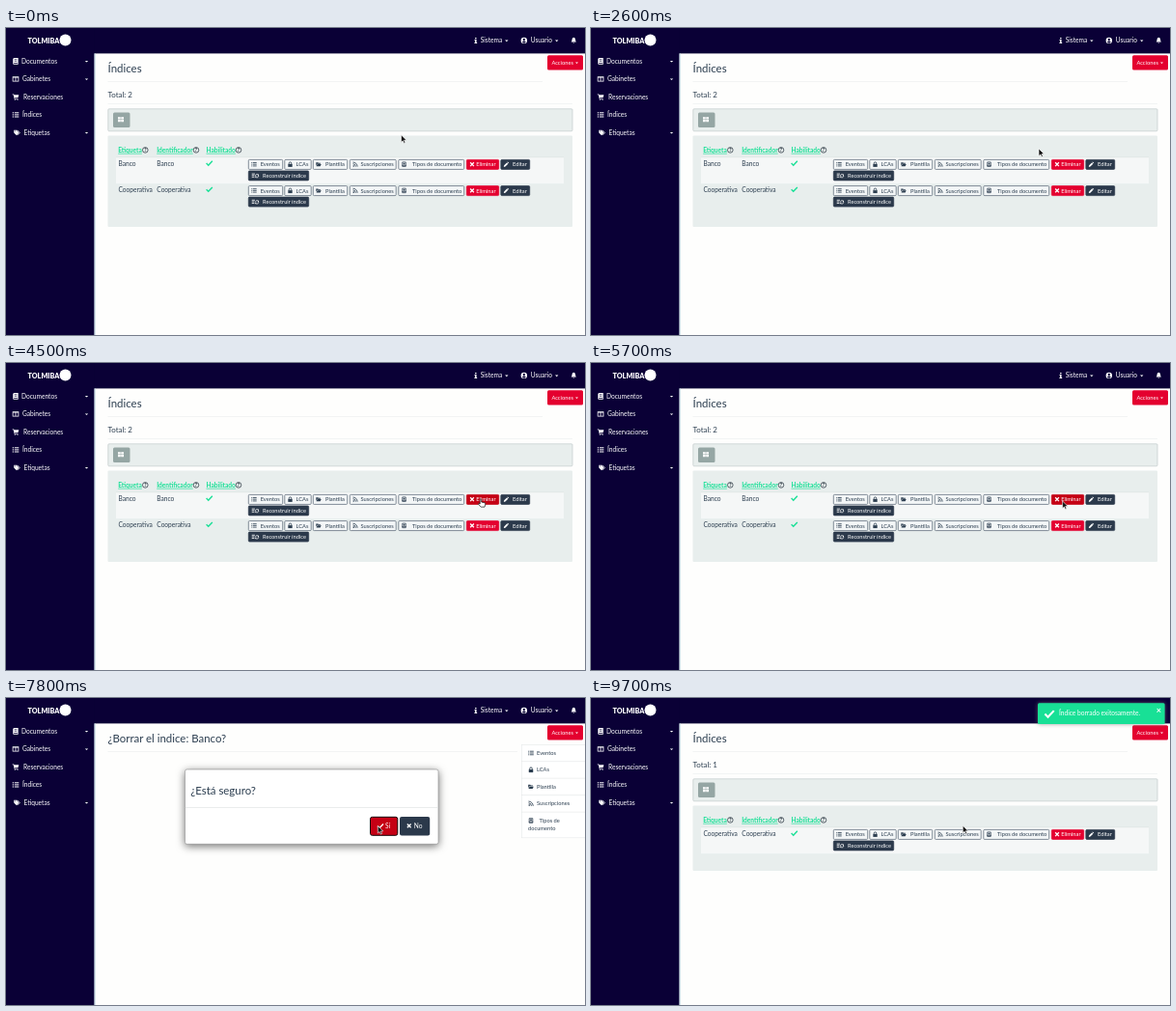
An HTML page for the animation above (9900 ms loop, 600 px wide and 318 px high).

```html
<!DOCTYPE html>
<html lang="es">
<head>
<meta charset="utf-8">
<title>Índices</title>
<style>
  html, body { margin: 0; width: 100%; height: 100%; overflow: hidden; background: #fefefd; }
  svg { display: block; width: 600px; height: 318px; font-family: Lato, sans-serif; }
  text { white-space: pre; }
</style>
</head>
<body>
<svg id="stage" viewBox="0 0 600 318"></svg>
<script>
const LOOP = 9900, TICK = 100;
const CLICK = 5700, ASK = 6000, CONFIRM = 7600, DONE = 7900, FADE = 300;
const NAVY = '#0a0036', INK = '#2c3e50', DARK = '#2b394b', RED = '#e4002f',
      HOVER = '#c50014', GREEN = '#18e096', WELL = '#e8eeed', WHITE = '#fff';

// Icons live in a 10 x 10 box.
const line = (d, w = 1.5) => `<path d="${d}" fill="none" stroke="currentColor" stroke-width="${w}"/>`;
const solid = d => `<path d="${d}" fill-rule="evenodd"/>`;
const icons = {
  list: line('M0 1.8H2M0 5H2M0 8.2H2M3.2 1.8H10M3.2 5H10M3.2 8.2H10'),
  lock: solid('M1 4.5H9V10H1Z') + line('M2.7 5V3A2.3 2.3 0 0 1 7.3 3V5'),
  folder: solid('M0 1.3H3.6L4.8 2.5H8.5V4H2.2L0 7.7ZM2.6 4.7H10L8 8.8H.4Z'),
  rss: line('M.5 1A8.5 8.5 0 0 1 9 9.5M.5 4.2A5.3 5.3 0 0 1 5.8 9.5') + '<circle cx="1.8" cy="8.2" r="1.4"/>',
  type: line('M1.8 .8H8.2V9.2H1.8ZM1 7.2H9', 1.4) + solid('M3.5 2.5H6.5V5.5H3.5Z'),
  cross: line('M1.5 1.5L8.5 8.5M8.5 1.5L1.5 8.5', 2.4),
  pencil: solid('M0 10L.7 7L6 1.7L8.3 4L3 9.3ZM6.6 1.1L7.7 0L10 2.3L8.9 3.4Z'),
  check: line('M.6 5.3L3.6 8.2L9.5 2', 2),
  book: solid('M2 0H9V10H2A1.5 1.5 0 0 1 .8 8.5V1.3ZM2.2 7.8V8.8H7.8V7.8ZM3 2V3H7V2ZM3 4V5H7V4Z'),
  columns: solid('M0 1H10V9H0ZM1.2 3V7.8H4.4V3ZM5.6 3V7.8H8.8V3Z'),
  cart: solid('M0 .6H2.2L2.6 1.9H10L8.8 6H3.7L3.9 7H8.6V8H3L1.5 1.7H0Z') +
    '<circle cx="4" cy="9" r="1"/><circle cx="8" cy="9" r="1"/>',
  tag: solid('M0 1H4L8.2 5.2L4.2 9.2L0 5ZM1.3 2.2V3.4H2.5V2.2Z') + line('M5.3 1L9.4 5.2L5.8 8.8', 1),
  info: solid('M3.8 0H6.2V2.2H3.8ZM3 3.5H6.2V8.4H7.2V10H2.8V8.4H3.8V5H3Z'),
  user: solid('M5 0A5 5 0 1 1 5 10A5 5 0 1 1 5 0ZM5 1.8A1.8 1.8 0 1 0 5 5.4A1.8 1.8 0 1 0 5 1.8ZM2 7.7Q5 10.6 8 7.7Q6.5 5.8 5 6.2Q3.5 5.8 2 7.7Z'),
  bell: solid('M5 0Q8 .8 8 4Q8 6.5 9.3 7.8H.7Q2 6.5 2 4Q2 .8 5 0ZM3.7 8.5H6.3Q5 10.8 3.7 8.5Z'),
  grid: solid('M0 .8H4.6V4.6H0ZM5.4 .8H10V4.6H5.4ZM0 5.4H4.6V9.2H0ZM5.4 5.4H10V9.2H5.4Z'),
  rebuild: line('M-2 2H4M-2 5H3M-2 8H3') + line('M5 5.5A3 2.8 0 0 1 10.5 4M11 5.5A3 2.8 0 0 1 5.5 7.5', 1.4) +
    solid('M11.5 1.8V5H8.8ZM4.4 9.6V6.4H7.2Z')
};

const icon = (name, cx, cy, size, color) =>
  `<g transform="translate(${cx - size / 2} ${cy - size / 2}) scale(${size / 10})" fill="currentColor" color="${color}">${icons[name]}</g>`;
const text = (s, x, y, size = 6.6, color = INK, extra = '') =>
  `<text x="${x}" y="${y}" font-size="${size}" fill="${color}" ${extra}>${s}</text>`;
const rect = (x, y, w, h, fill, extra = '') =>
  `<rect x="${x}" y="${y}" width="${w}" height="${h}" fill="${fill}" ${extra}/>`;
const rule = (x1, x2, y, color = '#ecefef') => rect(x1, y, x2 - x1, .6, color);
const caret = (x, y, w = 3.4) => `<path d="M${x - w / 2} ${y}h${w}l${-w / 2} ${w / 2}z" fill="#fff"/>`;

function button(label, glyph, x, y, w, tx, fill, id = '') {
  const plain = !fill, color = plain ? INK : WHITE;
  return rect(x + .3, y + .3, w - .6, 10, fill || '#f3f6f7', `rx="1" stroke="${plain ? '#526070' : fill}" stroke-width=".7" ${id}`) +
    icon(glyph, x + (glyph === 'rebuild' ? 7.5 : 6), y + 5.1, 5.4, color) + text(label, tx, y + 7.2, 5.72, color);
}

function row(name, y, striped, id) {
  return (striped ? rect(114, y, 464, 26.8, '#f5f7f7') : '') +
    text(name, 116.5, y + 8.3) + text(name, 156.3, y + 8.3) +
    icon('check', 210.7, y + 5.6, 7, GREEN) +
    button('Eventos', 'list', 251, y + 1.8, 36, 263.7) +
    button('LCAs', 'lock', 288.5, y + 1.8, 28, 300.5) +
    button('Plantilla', 'folder', 318, y + 1.8, 36, 331) +
    button('Suscripciones', 'rss', 356, y + 1.8, 48.5, 367.5) +
    button('Tipos de documento', 'type', 406.5, y + 1.8, 68.5, 421) +
    button('Eliminar', 'cross', 477, y + 1.8, 34, 487.3, RED, id) +
    button('Editar', 'pencil', 512.5, y + 1.8, 30.5, 525, DARK) +
    button('Reconstruir índice', 'rebuild', 251, y + 13.3, 63, 266, DARK);
}

const header = (s, x, qx) =>
  text(s, x, 128.8, 6.6, GREEN, 'font-weight="700" text-decoration="underline"') +
  `<circle cx="${qx}" cy="126.4" r="2.8" fill="none" stroke="#1b2733" stroke-width=".7"/>` +
  text('?', qx, 128.4, 5, '#1b2733', 'font-weight="700" text-anchor="middle"');

function listPage(names) {
  return text('Índices', 105.6, 45.8, 11.44) + rule(105.5, 556, 55) +
    text('Total: ' + names.length, 105.6, 71.6, 7.92) + rule(105.5, 587, 78) +
    rect(105.8, 83.8, 481.2, 23, WELL, 'rx="1" stroke="#c3cbcc" stroke-width=".7"') +
    rect(111, 87.5, 17.5, 15.5, '#95a6a4', 'rx="1.5"') + icon('grid', 119, 94.8, 6, WHITE) +
    rect(105.5, 111.5, 481.5, names.length * 27.2 + 40.2, WELL, 'rx="1"') +
    header('Etiqueta', 116.2, 144.3) + header('Identificador', 156.2, 197) + header('Habilitado', 207.5, 241) +
    rule(114, 578, 133.4, '#dfe6e6') +
    names.map((n, i) => row(n, 134.3 + i * 27.2, i === 0, i === 0 && names.length > 1 ? 'id="remove"' : '')).join('');
}

function askPage() {
  const menu = [['Eventos', 'list', 57], ['LCAs', 'lock', 74.3], ['Plantilla', 'folder', 91.8], ['Suscripciones', 'rss', 109.3], ['Tipos de', 'type', 127]];
  return text('¿Borrar el indice: Banco?', 105.6, 45.8, 11.44) + rule(105.5, 530, 55) +
    rect(534.3, 48.3, 66, 96.5, WHITE, 'stroke="#e6e9ea" stroke-width=".6"') +
    menu.map(([s, g, y], i) => icon(g, 544, y, 5.6, INK) +
      text(s, i === 4 ? 552.5 : 550, y + 2, 5.72) + (i < 4 ? rule(534, 600, y + 8.5, '#e3e6e7') : '')).join('') +
    text('documento', 541, 137.2, 5.72) +
    rect(185.5, 74, 262.5, 77.3, WHITE, 'rx="2" stroke="#8d8d8d" stroke-width=".6" style="filter:drop-shadow(0 2px 4px rgba(0,0,0,.55))"') +
    text('¿Está seguro?', 191.3, 99.6, 11.44) + rule(185.8, 447.7, 113, '#dcdfe0') +
    rect(377.5, 123.3, 28.3, 19, RED, 'id="yes" rx="2"') + icon('check', 388, 132.5, 6.6, WHITE) + text('Sí', 393, 134.8, 6.6, WHITE) +
    rect(408, 123, 31.2, 19.5, DARK, 'rx="2"') + icon('cross', 417.7, 132.4, 5.4, WHITE) + text('No', 422.8, 134.8, 6.6, WHITE);
}

function frame() {
  const items = [['Documentos', 'book', 16, 1], ['Gabinetes', 'columns', 17, 1], ['Reservaciones', 'cart', 18, 0],
    ['Índices', 'list', 17, 0], ['Etiquetas', 'tag', 18.5, 1]];
  return rect(0, 0, 600, 26.4, NAVY) + rect(0, 0, 91.6, 318, NAVY) + rect(91.6, 26.4, 1, 291.6, '#bcd8e2') +
    text('TOLMIBA', 22.5, 16.4, 7.2, WHITE, 'font-weight="900"') + '<circle cx="61.5" cy="12.5" r="6" fill="#fff"/>' +
    items.map(([s, g, x, more], i) => {
      const y = 34.4 + i * 18.5;
      return icon(g, g === 'tag' ? 11.5 : 10, y, 6.6, WHITE) + text(s, x, y + 2.3, 6.6, WHITE) + (more ? caret(83.5, y - .5) : '');
    }).join('') +
    icon('info', 486.8, 13, 6.2, WHITE) + text('Sistema', 491.7, 15.4, 6.6, WHITE) + caret(518.8, 12.6) +
    icon('user', 536.8, 12.9, 6.4, WHITE) + text('Usuario', 543.8, 15.4, 6.6, WHITE) + caret(570.7, 12.6) +
    icon('bell', 588.3, 12.8, 6, WHITE) +
    rect(561, 28.3, 37, 15.3, RED, 'rx="1.5"') + text('Acciones', 565.4, 38, 5.72, WHITE) + caret(591.5, 35.4, 3);
}

const toast = rect(463, 5.2, 131.6, 21.8, GREEN, 'rx="1.5" style="filter:drop-shadow(0 0 2px rgba(120,120,120,.7))"') +
  icon('check', 475, 16.3, 10.5, WHITE) + text('Índice borrado exitosamente.', 485, 18.4, 6.6, WHITE) +
  text('×', 588.3, 16.2, 9, WHITE, 'font-weight="700" text-anchor="middle"');

const arrow = '<path d="M0 0V7.6L1.8 6L3 8.6L4.3 8L3.1 5.5H5.5Z" fill="#111" stroke="#fff" stroke-width=".6"/>';
const hand = '<path d="M-.8 0Q0-.8.7 0V2.7L4.2 3.5Q5 3.8 4.7 5L4 7.8H.2L-2.6 4.8Q-2.4 3.6-.8 4.6Z" fill="#fff" stroke="#111" stroke-width=".7"/>';

const stage = document.getElementById('stage');
const group = (id, body) => `<g id="${id}">${body}</g>`;
stage.innerHTML = rect(0, 0, 600, 318, '#fefefd') + group('before', listPage(['Banco', 'Cooperativa'])) +
  group('ask', askPage()) + group('after', listPage(['Cooperativa'])) + frame() + group('toast', toast) +
  group('pointer', group('arrow', arrow) + group('hand', hand));
const el = {};
stage.querySelectorAll('[id]').forEach(n => el[n.id] = n);

// Pointer stops: time, x, y.
const stops = [[1500, 409.5, 110.8], [2100, 450, 117], [2300, 450, 117], [2600, 464, 125], [3300, 497, 136],
  [3600, 499.5, 138], [4000, 496, 140], [4100, 496, 140], [4700, 490, 142], [5200, 490, 142], [5400, 488.6, 143],
  [ASK, 488.6, 143], [6600, 389, 135], [6700, 389, 135], [6900, 385.3, 133], [CONFIRM, 385.3, 133], [DONE, 385.3, 132.2]];

function pointerAt(t) {
  const i = stops.findIndex(s => s[0] > t);
  if (i === 0) return stops[0].slice(1);
  if (i < 0) return stops[stops.length - 1].slice(1);
  const [a, b] = [stops[i - 1], stops[i]], u = (t - a[0]) / (b[0] - a[0]);
  return [1, 2].map(k => a[k] + (b[k] - a[k]) * u);
}

const show = (node, on) => node.setAttribute('display', on ? 'inline' : 'none');

function draw(t) {
  show(el.before, t < ASK);
  show(el.ask, t >= ASK && t < DONE);
  show(el.after, t >= DONE);
  show(el.toast, t >= DONE);
  el.toast.setAttribute('opacity', Math.max(0, Math.min(1, (t - DONE) / FADE)));

  const overRemove = t >= 3300 && t < ASK, overYes = t >= 6500 && t < DONE, focus = t >= CONFIRM;
  el.remove.setAttribute('fill', overRemove ? HOVER : RED);
  el.remove.setAttribute('stroke', overRemove ? HOVER : RED);
  el.yes.setAttribute('fill', overYes ? HOVER : RED);
  el.yes.setAttribute('stroke', focus ? '#16090c' : overYes ? HOVER : RED);

  const [x, y] = pointerAt(t);
  const pointing = (overRemove && t < CLICK) || (overYes && t < CONFIRM);
  el.pointer.setAttribute('transform', `translate(${x} ${y})`);
  show(el.hand, pointing);
  show(el.arrow, !pointing);
}

const start = performance.now();
function loop() {
  const t = (performance.now() - start) % LOOP;
  draw(Math.floor(t / TICK) * TICK);
  requestAnimationFrame(loop);
}
loop();
</script>
</body>
</html>
```
